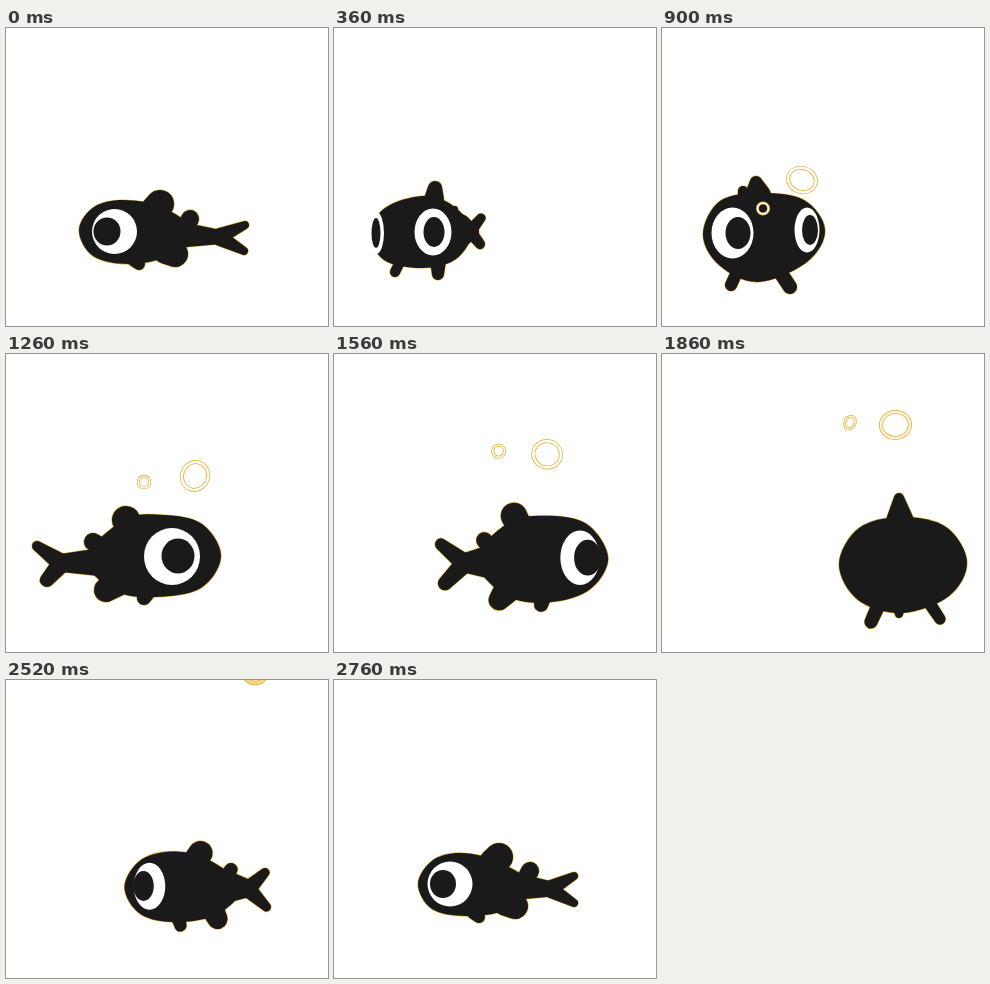
Write an HTML page with a canvas that moves like this. It is 322 by 298 pixels and loops after 2820 ms.

```html
<!DOCTYPE html>
<html lang="en">
<head>
<meta charset="utf-8">
<title>Fish</title>
<style>
  html, body { margin: 0; width: 100%; height: 100%; overflow: hidden; background: #fff; }
  canvas { display: block; width: 100%; height: 100%; }
</style>
</head>
<body>
<canvas width="322" height="298"></canvas>
<script>
const LOOP = 2820, STEP = 60;
const INK = '#1a1a1a', GOLD = '#e3ae36';
const ctx = document.querySelector('canvas').getContext('2d');

const poses = [];
const pose = (time, parts) => poses.push({ time, parts });

// body: outline points clockwise from the left
// limbs: x, y, radius at both ends; eyes: white and pupil as x, y, rx, ry
pose(0, {
  body: [73,202, 88,179, 118,172, 158,180, 192,207, 160,229, 122,236, 87,228],
  fin: [145,180,10, 154,176,14], smallFin: [178,200,8, 184,191,9],
  stem: [180,207,12, 214,209,7], tailUp: [214,208,8, 239,197,4], tailLow: [214,210,8, 238,223,4],
  legA: [127,232,6, 133,236,6], legB: [160,222,14, 169,226,13],
  eyeL: [108.5,203.5,22.5,22.5, 101,203.5,13.5,14], eyeR: [75,203,0,20, 75,203,0,14]
});
pose(360, {
  body: [36,205, 51,180, 88,168, 118,177, 138,203, 122,231, 88,240, 50,232],
  fin: [100,172,10, 101,160,7], smallFin: [117,186,6, 121,181,3],
  stem: [122,203,18, 138,204,7], tailUp: [138,201,6, 147,190,4.5], tailLow: [138,206,6, 146,216,5],
  legA: [67,232,5, 61,244,5], legB: [104,232,8, 104,246,6],
  eyeL: [99,204,18.5,23.5, 100,204,10.5,15], eyeR: [42.5,205,7.5,21, 42,205,4.5,15]
});
pose(600, {
  body: [12,207, 28,177, 70,170, 110,173, 134,203, 114,238, 72,248, 30,238],
  fin: [78,172,11, 80,157,7], smallFin: [86,182,6, 88,176,4],
  stem: [100,203,16, 110,204,7], tailUp: [110,201,6, 114,194,4], tailLow: [110,206,6, 114,214,4],
  legA: [42,240,6, 35,256,6], legB: [98,240,7, 103,257,7],
  eyeL: [103,205,18,25, 105,205,11,16], eyeR: [33,207,15,25, 35,207,10,16]
});
pose(900, {
  body: [41,206, 58,173, 98,165, 142,172, 163,202, 145,234, 96,254, 57,237],
  fin: [96,168,13, 94,154,6], smallFin: [82,172,6, 81,163,5],
  stem: [90,203,16, 80,204,8], tailUp: [80,202,8, 74,196,5], tailLow: [80,207,8, 75,214,6],
  legA: [75,244,6, 69,257,6], legB: [118,244,7, 128,259,7],
  eyeL: [145,202,12.5,22.5, 148,202,8,15], eyeR: [70.5,205,21,25.5, 76,205,12.5,16]
});
pose(1260, {
  body: [80,205, 118,166, 158,161, 196,170, 215,202, 195,234, 150,243, 110,237],
  fin: [125,172,12, 120,166,14], smallFin: [94,192,9, 87,188,9],
  stem: [95,208,14, 56,209,9], tailUp: [54,208,9, 31,192,5], tailLow: [54,211,9, 41,226,7],
  legA: [112,228,14, 100,236,12], legB: [140,240,8, 138,244,7],
  eyeL: [213,201,0,20, 213,201,0,14], eyeR: [166,202.5,28,28.5, 172,202,16.5,17.5]
});
pose(1620, {
  body: [155,205, 185,170, 222,162, 264,170, 286,205, 265,238, 220,250, 180,240],
  fin: [196,170,13, 192,161,13], smallFin: [168,192,8, 163,186,8],
  stem: [165,208,16, 143,209,9], tailUp: [143,207,9, 122,190,6], tailLow: [143,212,9, 125,230,7],
  legA: [185,238,13, 178,248,10], legB: [222,246,8, 221,252,7],
  eyeL: [155,205,0,24, 155,205,0,16], eyeR: [262,204,18,27, 270,204,13,18]
});
pose(1860, {
  body: [177,210, 197,174, 240,163, 284,173, 305,208, 287,242, 240,259, 196,246],
  fin: [238,168,14, 237,144,5], smallFin: [237,185,8, 237,178,6],
  stem: [240,205,20, 238,235,8], tailUp: [238,215,8, 238,205,5], tailLow: [237,250,7, 237,260,4],
  legA: [216,252,7, 209,268,6.5], legB: [268,250,6, 278,265,5.5],
  eyeL: [178,209,0,25, 177,209,0,16], eyeR: [305,206,0,25, 305,206,0,16]
});
pose(2280, {
  body: [153,210, 172,179, 212,170, 245,180, 270,208, 252,238, 212,248, 172,240],
  fin: [226,176,14, 224,169,10], smallFin: [252,192,7, 254,188,4],
  stem: [255,207,18, 270,208,9], tailUp: [270,207,8, 278,189,5], tailLow: [270,211,8, 281,231,5],
  legA: [206,244,8, 204,254,6], legB: [243,240,8, 242,252,7],
  eyeL: [171,208.5,9,24.5, 166,208,7.5,16], eyeR: [153,208,0,20, 153,208,0,14]
});
pose(2760, {
  body: [84,204, 99,180, 128,173, 165,182, 200,207, 172,230, 132,236, 98,229],
  fin: [156,180,10, 165,177,14], smallFin: [190,200,8, 196,191,9],
  stem: [190,207,12, 217,209,7.5], tailUp: [217,208,8, 240,196,4], tailLow: [217,210,8, 240,223,4],
  legA: [139,233,6, 145,237,6], legB: [172,222,14, 181,226,13],
  eyeL: [116,204,22.5,22.5, 109,204,13,14], eyeR: [86,203,0,20, 86,203,0,14]
});
pose(LOOP, poses[0].parts);

// each key: time, x, y, rx, ry, tilt, line width
const bubbles = [
  [[600, 95,186,5,5,0,2], [720, 116,167,10,9,.2,2.5], [900, 140,152,14,12,.3,3],
   [1260, 189,122,13,14,.4,3], [1620, 218,96,14,13,.2,3], [1860, 233.5,71,14.5,13,-.1,3],
   [2280, 245.5,27.5,12.5,15,-.3,3.5], [2580, 250,-20,13,13,0,3.5]],
  [[780, 90,197,2,2,0,2], [900, 101,180.5,5.5,5.5,0,2], [1260, 138,128,5.8,5.8,0,2],
   [1620, 170,91,6,6,.2,2], [1860, 188,68.5,5,6.3,.5,2], [2280, 195.5,16,6,5,-.2,2.5],
   [2460, 198,-12,6,6,0,2.5]]
];

const lerp = (a, b, k) => a + (b - a) * k;
const mix = (a, b, k) => a.map((v, i) => lerp(v, b[i], k));

function span(keys, time, timeOf) {
  const i = keys.findIndex((key, n) => n && timeOf(key) >= time);
  const [a, b] = [keys[i - 1], keys[i]];
  return [a, b, (time - timeOf(a)) / (timeOf(b) - timeOf(a))];
}

function smoothLoop(c) {
  const path = new Path2D(), n = c.length / 2;
  const at = i => [c[(i + n) % n * 2], c[(i + n) % n * 2 + 1]];
  path.moveTo(...at(0));
  for (let i = 0; i < n; i++) {
    const [p, q, r, s] = [at(i - 1), at(i), at(i + 1), at(i + 2)];
    path.bezierCurveTo(q[0] + (r[0] - p[0]) / 6, q[1] + (r[1] - p[1]) / 6,
      r[0] - (s[0] - q[0]) / 6, r[1] - (s[1] - q[1]) / 6, ...r);
  }
  path.closePath();
  return path;
}

function limb([x1, y1, r1, x2, y2, r2]) {
  const path = new Path2D();
  const dir = Math.atan2(y2 - y1, x2 - x1);
  const ratio = (r1 - r2) / Math.hypot(x2 - x1, y2 - y1);
  const open = Math.acos(Math.max(-1, Math.min(1, ratio)));
  path.arc(x1, y1, r1, dir + open, dir - open + 2 * Math.PI);
  path.arc(x2, y2, r2, dir - open, dir + open);
  path.closePath();
  return path;
}

function oval(x, y, rx, ry, color) {
  if (rx < .3) return;
  ctx.fillStyle = color;
  ctx.beginPath();
  ctx.ellipse(x, y, rx, ry, 0, 0, 2 * Math.PI);
  ctx.fill();
}

function drawFish(time) {
  const [a, b, k] = span(poses, time, p => p.time);
  const part = name => mix(a.parts[name], b.parts[name], k);
  const limbs = ['fin', 'smallFin', 'stem', 'tailUp', 'tailLow', 'legA', 'legB'];
  const shapes = [smoothLoop(part('body')), ...limbs.map(name => limb(part(name)))];
  ctx.strokeStyle = GOLD;
  ctx.lineWidth = 1.2;
  shapes.forEach(s => ctx.stroke(s));
  ctx.fillStyle = INK;
  shapes.forEach(s => ctx.fill(s));

  ctx.globalCompositeOperation = 'source-atop';
  for (const name of ['eyeL', 'eyeR']) {
    const eye = part(name);
    oval(...eye.slice(0, 4), '#fff');
    oval(...eye.slice(4), INK);
  }
  ctx.globalCompositeOperation = 'source-over';
}

function drawBubble(keys, time) {
  if (time < keys[0][0] || time > keys[keys.length - 1][0]) return;
  const [a, b, k] = span(keys, time, key => key[0]);
  const [, x, y, rx, ry, tilt, width] = mix(a, b, k);
  const warm = Math.max(0, Math.min(1, (time - 1700) / 500));
  ctx.beginPath();
  ctx.ellipse(x, y, rx, ry, tilt, 0, 2 * Math.PI);
  ctx.strokeStyle = GOLD;
  ctx.lineWidth = width + 1;
  ctx.stroke();
  ctx.strokeStyle = `rgb(${lerp(255, 248, warm)}, ${lerp(255, 217, warm)}, ${lerp(255, 130, warm)})`;
  ctx.lineWidth = width - .5;
  ctx.stroke();
}

function draw(now) {
  const time = Math.floor(now % LOOP / STEP) * STEP;
  ctx.clearRect(0, 0, 322, 298);
  drawFish(time);
  bubbles.forEach(keys => drawBubble(keys, time));
}

let start;
function tick(now) {
  start ??= now;
  draw(now - start);
  requestAnimationFrame(tick);
}
draw(0);
requestAnimationFrame(tick);
</script>
</body>
</html>
```
